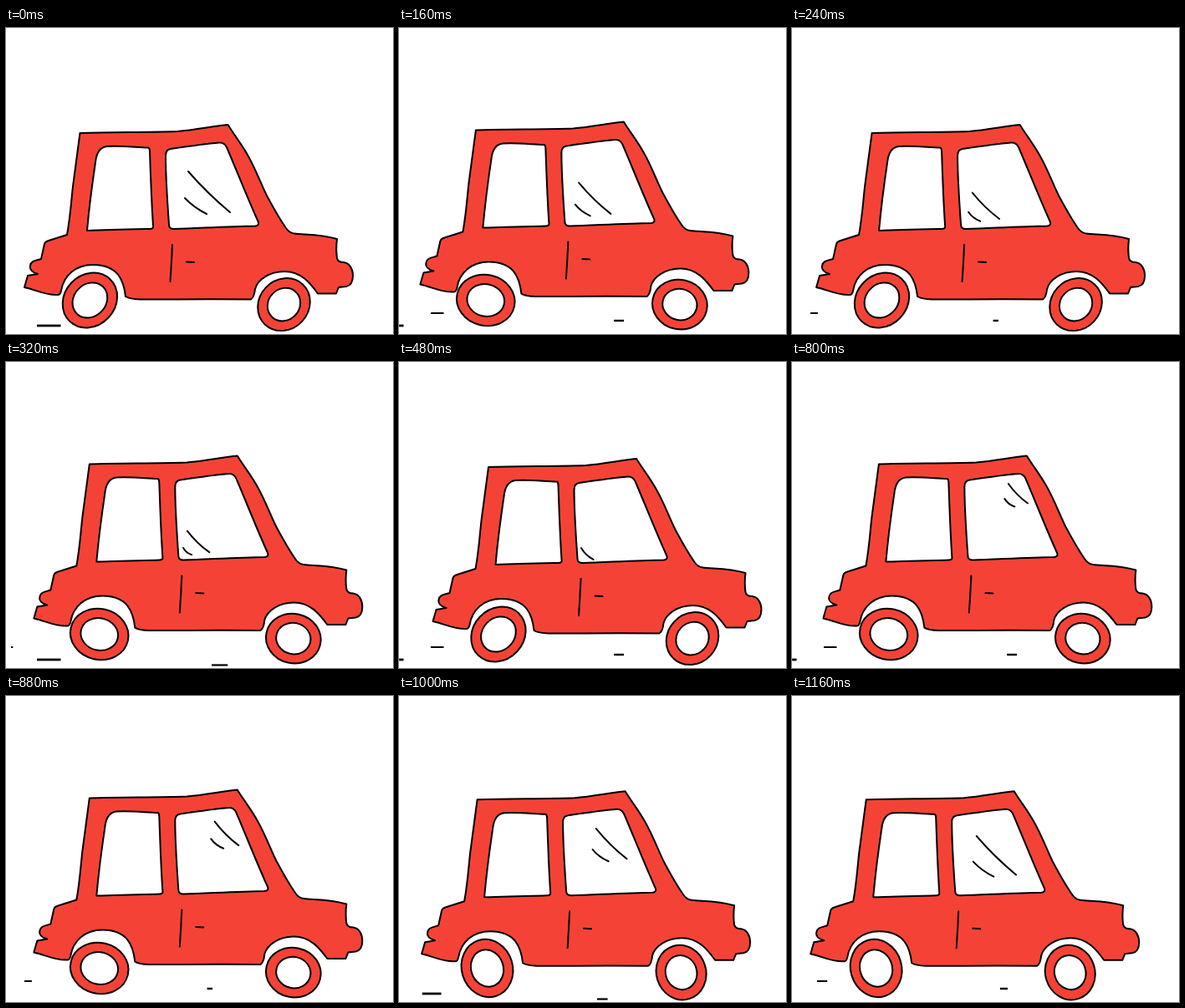
These frames come from a looping animation (463x367 px, 1.2 s). An HTML page:

```html
<!DOCTYPE html>
<html lang="en">
<head>
<meta charset="utf-8">
<title>Red car</title>
<style>
  html, body { margin: 0; width: 100%; height: 100%; overflow: hidden; background: #fff; }
  svg { display: block; width: 463px; height: 367px; }
  .line { fill: none; stroke: #000; stroke-width: 2; stroke-linecap: round; stroke-linejoin: round; }
  .red { fill: #f44336; }
  .white { fill: #fff; }
  .dash { stroke: #000; }
</style>
</head>
<body>
<svg viewBox="0 0 463 367">
  <g id="dashes"></g>
  <g id="car">
    <path class="line red" d="M88.5 126 C125 124.5 165 125.5 205 124 C226 122.5 246 118 265.5 116
      C272 127 282 139 290 154 C299 170 305 187 312 201 C320 216 328 230 335 240 Q339 246 345 246.5
      C358 248 376 247 396 253 C395 261 395 269 396 276 Q397 281 404 281 C411 282 415 289 415 297
      C415 306 412 309 407 310 L398 311 L395 318.5 L373 318.5 C364 306 353 292 333 292
      C315 292 301 302 298 313 Q297 323 293 325.5 C245 325 205 325.5 160 325.5 Q148 325 143 322
      C141 304 135 284 104 284 C83 284 69 297 66 315 Q65 320 62 320 C48 321 36 314 22 311 L26 297 L38 295
      C31 293 28 289 29 285 C30 279 36 279 42 277 L46 259 Q47 256 51 255 L73 248
      C77 226 78 208 80 190 Z"/>
    <path class="line white" d="M97 243 C99 220 103 188 107 161 Q109 143 121 142 C138 141 154 143 170 143.5
      Q172 144 172 148 C173 178 174 208 176 237 Q177 241 172 241 C148 241.5 122 242 97 243 Z"/>
    <path class="line white" d="M197 145 C217 142 237 139 255 137.5 Q261 137 264 143 C276 171 288 202 302 233
      Q303 237 298 237.5 C266 238 232 240 201 241 Q195 241 195 236 C193 208 191 180 191 153 Q191 146 197 145 Z"/>
    <path class="line" d="M199 260 Q198 282 196.5 304 M216 280.5 L225 281"/>
    <path class="line" id="shine"/>
  </g>
  <g id="wheels">
    <g id="rear">
      <ellipse class="line red" rx="35" ry="30.5"/>
      <ellipse class="line white" rx="22.5" ry="19.3"/>
    </g>
    <g id="front">
      <ellipse class="line red" rx="33" ry="29.7"/>
      <ellipse class="line white" rx="20.7" ry="18.7"/>
    </g>
  </g>
</svg>
<script>
const STEP = 40, STEPS = 30;
const $ = id => document.getElementById(id);
const set = (id, name, value) => $(id).setAttribute(name, value);

// Ground dashes: first step, ends, height, speed of each end, thickness
const DASHES = [
  { start: 0, x0: 37, x1: 65.5, y: 357, v0: 9.2, v1: 15, w: 2.8 },
  { start: 4, x0: 38, x1: 53.5, y: 342, v0: 8, v1: 11.3, w: 2 },
  { start: 7, x0: 255, x1: 281, y: 363.5, v0: 9, v1: 15.7, w: 2.2 },
  { start: 3, x0: 265.5, x1: 280, y: 351, v0: 8.3, v1: 11, w: 2.4 }
];

// Window glints: end points and their speed per step, sliding out and coming back in
const GLINTS = [
  { at: [218, 172, 268, 221], out: [-1.55, 4.25, -4.5, 1.33], back: [-2.55, 2.25, 0.13, 4.8] },
  { at: [214, 204, 240, 223], out: [-1.65, 2.8, -3.65, 1.45], back: [-2.5, 3.65, -1.1, 4.6] }
];

function dash(d, k) {
  const age = k < d.start ? -1 : (k - d.start) % 8;
  const a = d.x0 - d.v0 * age, b = d.x1 - d.v1 * age;
  if (age < 0 || age > 4 || b <= a) return "";
  return `<path class="dash" stroke-width="${d.w}" d="M${a} ${d.y}H${b}"/>`;
}

function glint(g, k) {
  const leaving = k < STEPS / 2;
  const n = leaving ? k : k - STEPS;
  const v = leaving ? g.out : g.back;
  const [x0, y0, x1, y1] = g.at.map((p, i) => p + v[i] * n);
  if (x1 - x0 < 2.5) return "";
  return `M${x0} ${y0}Q${(x0 + x1) / 2 - 2} ${(y0 + y1) / 2 + 2} ${x1} ${y1}`;
}

function draw(k) {
  const dx = 10.25 * (1 - Math.cos(2 * Math.PI * k / STEPS));
  const bounce = 1 - Math.abs(k % 6 - 3) / 3;
  const spin = 133 + 360 * bounce;
  set("car", "transform", `translate(${dx} ${-5.2 * bounce})`);
  set("wheels", "transform", `translate(${dx} 0)`);
  set("rear", "transform", `translate(100.4 326.5) rotate(${spin})`);
  set("front", "transform", `translate(332.5 331.6) rotate(${spin})`);
  set("shine", "d", GLINTS.map(g => glint(g, k)).join(""));
  $("dashes").innerHTML = DASHES.map(d => dash(d, k)).join("");
}

function tick() {
  draw(Math.floor(performance.now() / STEP) % STEPS);
  requestAnimationFrame(tick);
}
tick();
</script>
</body>
</html>
```
